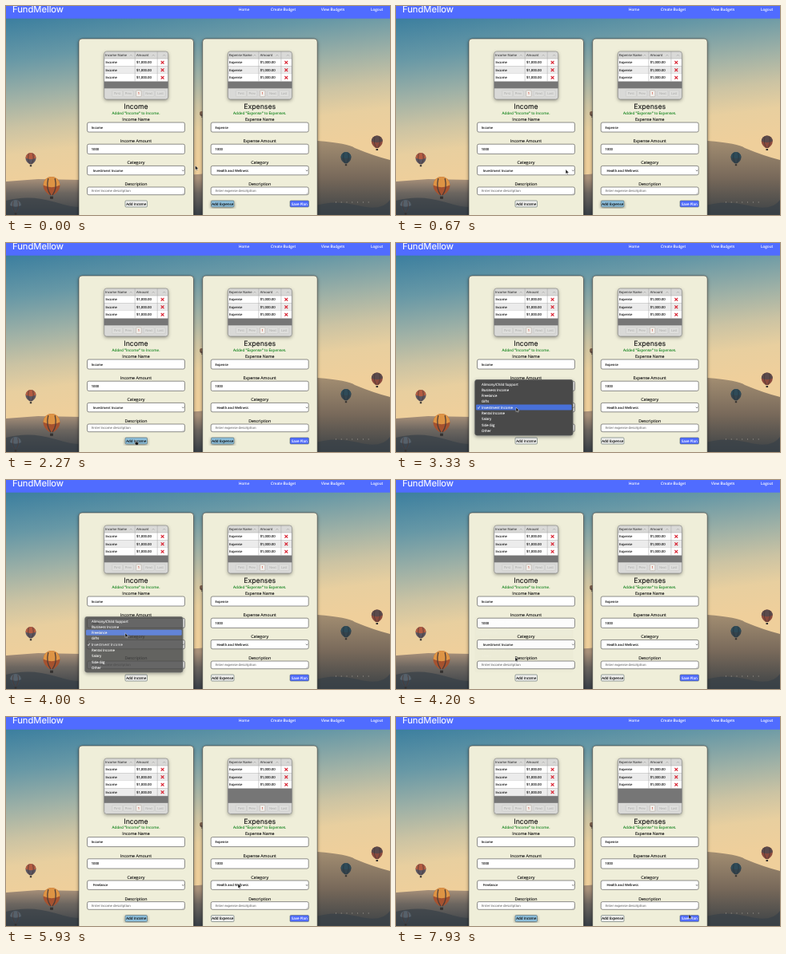
An HTML page for the animation above (8000 ms loop, 480 px wide and 262 px high).

```html
<!DOCTYPE html>
<html lang="en">
<head>
<meta charset="utf-8">
<title>Budget planner</title>
<style>
  html, body { margin: 0; width: 100%; height: 100%; overflow: hidden; background: #506cff; }
  svg { display: block; width: 100vw; height: 100vh; }
  text { font-family: "Open Sans", "Noto Sans", sans-serif; text-rendering: geometricPrecision; white-space: pre; stroke-width: .12; }
  .head { font-family: Inter, sans-serif; }
  .mid { text-anchor: middle; }
</style>
</head>
<body>
<svg id="stage" viewBox="0 0 480 262" preserveAspectRatio="none"></svg>
<script>
const LOOP = 8000, OPEN = 2930, CLOSE = 3980, PICK = 4230, ADD = 4870;
const ROW = 9.5, PITCH = 7.32;
const stage = document.getElementById('stage');
const options = ['Alimony/Child Support', 'Business Income', 'Freelance', 'Gifts',
  'Investment Income', 'Rental Income', 'Salary', 'Side Gig', 'Other'];

// time, x, y of the pointer tip
const route = [
  [0, 236.5, 200], [530, 219, 203], [1270, 146.5, 222.5], [1500, 147, 224],
  [2150, 162, 247], [2400, 162, 247], [2900, 150, 206], [3350, 150, 206],
  [3700, 149, 191], [3980, 149, 191], [4200, 149, 222], [4650, 162, 247],
  [5000, 162, 249], [5600, 275, 210], [5800, 290, 209], [5950, 290, 209],
  [6200, 307, 214], [6600, 308, 215], [6730, 322, 226], [7530, 323, 229], [7900, 366, 247.5]
];

const rect = (x, y, w, h, fill, extra = '') =>
  `<rect x="${x}" y="${y}" width="${w}" height="${h}" fill="${fill}" ${extra}/>`;
const text = (x, y, size, str, fill = '#111', extra = '') =>
  `<text x="${x}" y="${y}" font-size="${size}" fill="${fill}" stroke="${fill}" ${extra}>${str}</text>`;
const mid = (x, y, size, str, fill) => text(x, y, size, str, fill, 'class="mid"');
const line = (d, color, width = 0.6, extra = '') =>
  `<path d="${d}" fill="none" stroke="${color}" stroke-width="${width}" ${extra}/>`;
const shift = (x, y, body) => `<g transform="translate(${x} ${y})">${body}</g>`;

function gradient(id, [x1, y1, x2, y2], stops) {
  return `<linearGradient id="${id}" gradientUnits="userSpaceOnUse" x1="${x1}" y1="${y1}" x2="${x2}" y2="${y2}">` +
    stops.map(([o, c]) => `<stop offset="${o}" stop-color="${c}"/>`).join('') + '</linearGradient>';
}

function balloon(x, y, r, light, dark, seam = '#4a3b38') {
  const b = y + r * 1.2;
  return `<path d="M${x - r} ${y}a${r} ${r} 0 0 1 ${2 * r} 0Q${x + r} ${y + r * .7} ${x + r * .25} ${b}H${x - r * .25}Q${x - r} ${y + r * .7} ${x - r} ${y}Z" fill="${dark}"/>` +
    `<path d="M${x - r} ${y}a${r} ${r} 0 0 1 ${2 * r} 0Q${x} ${y + r * .5} ${x - r} ${y}Z" fill="${light}"/>` +
    line(`M${x - r * .4} ${y - r * .8}Q${x - r * .7} ${y + r * .4} ${x - r * .1} ${b}M${x + r * .4} ${y - r * .8}Q${x + r * .7} ${y + r * .4} ${x + r * .1} ${b}`, seam, r * .12) +
    rect(x - r * .18, b + r * .15, r * .36, r * .3, '#33302f');
}

function backdrop() {
  return '<defs>' +
    gradient('sky', [0, 16, 26, 222], [[0, '#3c7f9f'], [.25, '#6798a6'], [.48, '#9fb1a6'],
      [.66, '#cbc3a3'], [.82, '#e8cf9f'], [1, '#efcf9b']]) +
    gradient('plain', [0, 216, 0, 262], [[0, '#a9917a'], [.4, '#6c6660'], [1, '#383f46']]) +
    gradient('hill', [0, 168, 0, 262], [[0, '#a38e72'], [.5, '#78695a'], [1, '#3c4246']]) +
    `<filter id="soft" x="-10%" y="-10%" width="120%" height="125%">` +
    `<feDropShadow dx="0" dy="1.5" stdDeviation="2" flood-opacity=".4"/></filter></defs>` +
    rect(0, 15, 480, 247, 'url(#sky)') +
    `<path d="M0 220L40 217 95 218 240 211 300 205 480 215V262H0Z" fill="url(#plain)"/>` +
    `<path d="M300 190Q350 166 389 169T436 178Q460 188 480 193V262H300Z" fill="url(#hill)"/>` +
    `<path d="M0 244Q30 236 62 246T100 250V262H0ZM380 252Q410 242 440 250T480 243V262H380Z" fill="#384148" opacity=".7"/>` +
    line('M412 246H455', '#c9c3b6', .8, 'stroke-dasharray=".8 6"') +
    balloon(57, 224.5, 10.5, '#de9444', '#a5522f') +
    balloon(31, 190.5, 6.5, '#b35b41', '#5a5560') +
    balloon(12, 250, 7, '#56606a', '#3b454e') +
    balloon(463.8, 169.5, 7, '#5a4a4c', '#8c4a3d') +
    balloon(425, 189.5, 6.5, '#2f4b58', '#34434c', '#26363f') +
    balloon(245, 135, 3, '#8d6d55', '#6d5648');
}

function navbar() {
  return rect(0, 0, 480, 15.7, '#506cff') +
    text(8, 8.2, 11.2, 'FundMellow', '#fff', 'class="head"') +
    [[291, 'Home'], [331, 'Create Budget'], [394, 'View Budgets'], [456, 'Logout']]
      .map(([x, s]) => text(x, 6, 4.7, s, '#fff')).join('');
}

// Table with its own top left corner at 0,0
function table(kind, rows, grown) {
  const h = grown ? 69.5 : 60, foot = h - 13.7;
  let s = rect(0, 0, 80, h, '#d9d9d7', 'rx="3" filter="url(#soft)"');
  s += rect(0, 9, 80, foot - 9, '#767676');
  for (let i = 0; i < rows; i++) {
    const y = 9 + i * ROW;
    s += rect(0, y, 80, ROW, i % 2 ? '#ececec' : '#fff') +
      text(1.7, y + 6.4, 4.2, kind) + text(40.3, y + 6.4, 4.2, '$1,000.00') +
      line(`M71 ${y + 2.8}l3.8 3.8m0 -3.8l-3.8 3.8`, '#d8202f', 1.2) +
      line(`M0 ${y + ROW}H80`, '#b9b9b9', .4);
  }
  const end = 9 + rows * ROW;
  s += line(`M38.5 0V${end}M66.5 0V${end}M0 9H80`, '#a5a5a5', .5) +
    text(1.4, 6.3, 4.15, kind + ' Name', '#444') + text(40.3, 6.3, 4.15, 'Amount', '#444') +
    [33.5, 61.5, 75].map(x => line(`M${x - 1.5} 5.6l1.5 -1.5 1.5 1.5`, '#999')).join('');
  [[10, 13, 'First'], [24, 12.5, 'Prev'], [40, 6.5, '1'], [49.5, 13, 'Next'], [64, 12.5, 'Last']]
    .forEach(([x, w, label]) => {
      const on = label === '1';
      s += rect(x, foot + 2.6, w, 7.8, on ? '#f1eeea' : '#dededc', `rx="1" stroke="${on ? '#a9a098' : '#c4c4c2'}" stroke-width=".5"`) +
        mid(x + w / 2, foot + 8, 4.1, label, on ? '#c8412e' : '#b4b4b2');
    });
  return s + rect(0, 0, 80, h, 'none', 'rx="3" stroke="#777" stroke-width=".6"');
}

const field = (y, h, value, x = 106.7, color) =>
  rect(101.5, y, 122, h, '#fff', 'rx="2" stroke="#444" stroke-width=".6"') +
  text(x, y + h / 2 + 1.5, 4.2, value, color);

function button(x, w, label, fill, color, extra = '') {
  return rect(x, 244, w, 8, fill, `rx="1.2" stroke="#566" stroke-width=".6" ${extra}`) +
    mid(x + w / 2, 249.6, 4.5, label, color);
}

const addButton = (x, w, label, lit) =>
  button(x, w, label, lit ? '#8dbfdc' : '#f0f0ee', '#111', lit ? 'filter="url(#soft)"' : '');

function form(kind, title, category) {
  const c = 162.5;
  return text(c, 129, 8.7, title, '#151515', 'class="head mid"') +
    mid(c, 135.7, 4.7, `Added "${kind}" to ${title}.`, '#16851f') +
    mid(c, 143.8, 5.25, kind + ' Name') + field(146, 12, kind) +
    mid(c, 171, 5.25, kind + ' Amount') + field(173.2, 12.2, '1000') +
    mid(c, 198, 5.25, 'Category') + field(200.4, 11.4, category, 108.7) +
    line('M220.3 205.6l1.1 1.3 1.1 -1.3', '#222') +
    mid(c, 225, 5.25, 'Description') +
    field(227, 9.7, `Enter ${kind.toLowerCase()} description`, 107, '#777') +
    line('M220.5 236l2.3 -2.3M221.9 236l.9 -.9', '#777', .4);
}

function card(kind, title, category, rows, grown) {
  const top = grown ? 36 : 41;
  return rect(91, top, 143.5, 236, '#efeed9', 'rx="4" stroke="#333" stroke-width=".6" filter="url(#soft)"') +
    shift(122.7, top + 16, table(kind, rows, grown)) +
    shift(0, grown ? 4.6 : 0, form(kind, title, category));
}

function menu(y, alpha) {
  const hot = Math.max(0, Math.min(8, Math.floor((y - 172.8) / PITCH)));
  let s = rect(98.5, 171.3, 122.7, 70, '#484a49', 'rx="3" stroke="#6d6f6e" stroke-width=".5" filter="url(#soft)"') +
    rect(100, 173.2 + hot * PITCH, 119.7, 7, '#4870d8', 'rx="1.3"') +
    line('M102 206.3l1 1.3 1.8 -2.9', '#fff', .7);
  options.forEach((o, i) => s += text(107, 178.5 + i * PITCH, 4.35, o, '#f2f2f2'));
  return `<g opacity="${alpha}">${s}</g>`;
}

function pointer(x, y, hand) {
  const d = hand
    ? 'M-.3 0q.6 -.6 1.1 0V2.4l2.3 .6q.8 .3 .6 1.1L3.2 6.2H.2L-1.6 3.6q.3 -.7 1.3 .2Z'
    : 'M0 0V5.6L1.3 4.4 2.1 6.2 3 5.8 2.2 4.1H4Z';
  return shift(x, y, `<path d="${d}" fill="#111" stroke="#fff" stroke-width=".4"/>`);
}

function tip(t) {
  const i = route.findIndex(p => p[0] > t);
  if (i < 0) return route[route.length - 1].slice(1);
  const [a, x, y] = route[i - 1], [b, u, v] = route[i];
  const k = (t - a) / (b - a), e = k * k * (3 - 2 * k);
  return [x + (u - x) * e, y + (v - y) * e];
}

const scenery = backdrop() + navbar();

function draw(t) {
  const [x, y] = tip(t), grown = t >= ADD, drop = grown ? 4.6 : 0;
  const over = (l, w) => x > l && x < l + w && y > 243 + drop && y < 252 + drop;
  const onIncome = over(149, 27.5), onSave = over(355, 23.5);
  let s = scenery +
    card('Income', 'Income', t < PICK ? 'Investment Income' : 'Freelance', grown ? 4 : 3, grown) +
    shift(154.7, 0, card('Expense', 'Expenses', 'Health and Wellness', 3, grown)) +
    shift(0, drop,
      addButton(149, 27.5, 'Add Income', onIncome || grown) +
      addButton(256.5, 28.5, 'Add Expense', t < OPEN) +
      button(355, 23.5, 'Save Plan', onSave ? '#4059d6' : '#506cff', '#fff'));
  if (t >= OPEN && t < PICK) {
    const left = t < CLOSE ? 1 : (PICK - t) / (PICK - CLOSE);
    s += menu(t < CLOSE ? y : 191, left * left);
  }
  stage.innerHTML = s + pointer(x, y, onIncome || onSave);
}

const start = performance.now();
function tick() {
  draw((performance.now() - start) % LOOP);
  requestAnimationFrame(tick);
}
tick();
</script>
</body>
</html>
```
